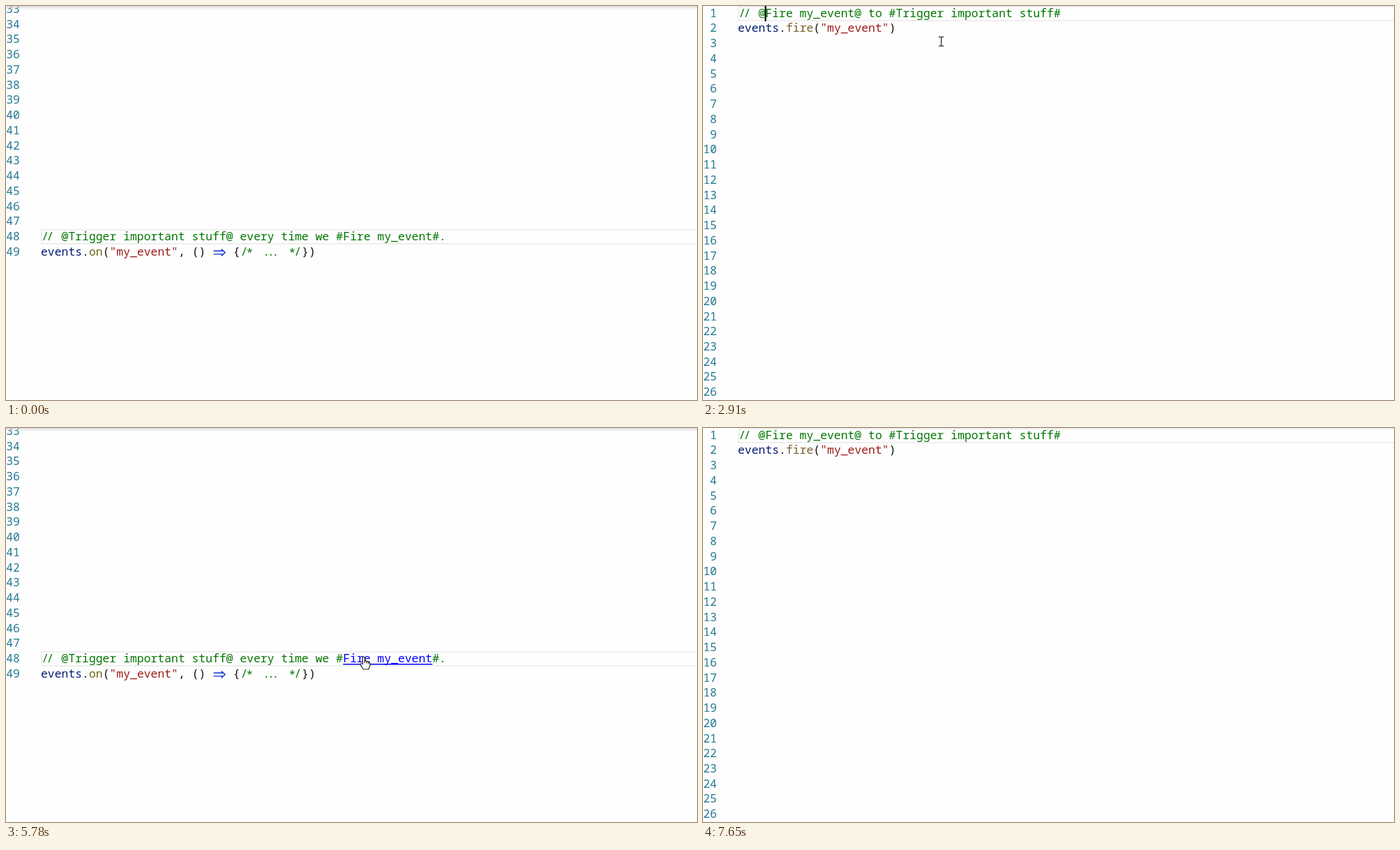
Animation, 991 px wide and 565 px high, one loop 8050 ms. Source, as an HTML page with a canvas:

```html
<!DOCTYPE html>
<html lang="en">
<head>
<meta charset="utf-8">
<title>Linked comments</title>
<style>
html, body { margin: 0; width: 100%; height: 100%; overflow: hidden; background: #fefefe; }
canvas { display: block; }
</style>
</head>
<body>
<canvas id="stage" width="991" height="565"></canvas>
<script>
const ctx = document.getElementById('stage').getContext('2d');
const LOOP = 8050, CELL = 9.85, ROW = 21.74, LEFT = 50;
const GREEN = '#007600', NAVY = '#001a70', OLIVE = '#795e26', RED = '#9c1a15',
      BLUE = '#0000ff', INK = '#111';

// Each page: code lines as [text, colour] runs, plus its marked and linked ranges.
const listener = {
  first: 33, last: 49, line: 48, base: 336, mark: [4, 23], link: [44, 13],
  code: [
    [['// @Trigger important stuff@ every time we #', GREEN], ['Fire my_event', GREEN], ['#.', GREEN]],
    [['events', NAVY], ['.', INK], ['on', '#6c6314'], ['(', INK], ['"my_event"', RED],
     [', () ', INK], ['=>', '#0a34d2'], [' {', INK], ['/* ... */', GREEN], ['})', INK]]
  ]
};
const sender = {
  first: 1, last: 26, line: 1, base: 15.7, mark: [4, 13], link: [23, 23],
  code: [
    [['// @Fire my_event@ to #', GREEN], ['Trigger important stuff', GREEN], ['#', GREEN]],
    [['events', NAVY], ['.', INK], ['fire', OLIVE], ['(', INK], ['"my_event"', RED], [')', INK]]
  ]
};

const JUMPS = [1670, 4010, 6170];
const HOVERS = [1440, 3540, 5870];
const HANDS = [[890, 1670], [3370, 4780], [5550, 6170]];
const LINKS = [[890, 1670], [3540, 4010], [5550, 6170]];

const easeOut = u => 1 - (1 - u) ** 3;
const easeInOut = u => u * u * (3 - 2 * u);
// start, end, from x, y, to x, y, easing
const MOVES = [
  [70, 400, 877, 493, 394, 243, easeInOut],
  [400, 740, 394, 243, 537, 333, easeInOut],
  [2530, 3290, 537, 333, 314, 11, easeOut],
  [4780, 5550, 314, 11, 513, 328, easeInOut],
  [6950, 7480, 513, 328, 862, 575, easeInOut]
];

const within = (list, t) => list.some(([a, b]) => t >= a && t < b);
const latest = (list, t) => list.filter(s => s <= t).pop();

// Horizontal shifts of the joined characters
const JOINED = { '//': [1.3, -1.3], '/*': [1, -1], '*/': [1, -1], '...': [3.4, 0, -3.4] };

function arrow(x, y) {
  ctx.beginPath();
  for (const d of [-2.3, 2.3]) {
    ctx.moveTo(x + 1.5, y + d);
    ctx.lineTo(x + 15.5, y + d);
  }
  ctx.moveTo(x + 12.5, y - 5);
  ctx.lineTo(x + 18, y);
  ctx.lineTo(x + 12.5, y + 5);
  ctx.lineWidth = 1.4;
  ctx.stroke();
}

function codeLine(runs, x, y, linkColour) {
  runs.forEach(([text, colour], i) => {
    ctx.fillStyle = ctx.strokeStyle = linkColour && i === 1 ? linkColour : colour;
    for (const part of text.split(/(\/\/|\/\*|\*\/|\.\.\.|=>)/)) {
      if (part === '=>') arrow(x, y - 4.2);
      else if (JOINED[part]) {
        [...part].forEach((c, k) =>
          ctx.fillText(c, x + k * CELL + JOINED[part][k], y + (c === '*' ? 2.5 : 0)));
      } else ctx.fillText(part, x, y);
      x += part.length * CELL;
    }
  });
}

function hover(page, other, alpha) {
  const x = LEFT + page.link[0] * CELL + 1, y = page.base - 67;
  ctx.globalAlpha = alpha;
  ctx.fillStyle = '#f1f4f4';
  ctx.fillRect(x, y, other.code[0].reduce((n, r) => n + r[0].length, 0) * CELL + 20.5, 53);
  ctx.strokeStyle = '#b4b8b8';
  ctx.lineWidth = 1;
  ctx.strokeRect(Math.round(x) + .5, Math.round(y) + .5,
    Math.round(other.code[0].reduce((n, r) => n + r[0].length, 0) * CELL + 20), 53);
  other.code.forEach((runs, i) => codeLine(runs, x + 10, y + 21.5 + i * ROW));
  ctx.globalAlpha = 1;
}

const handShape = new Path2D('M-1.5 9V1Q0-1 1.5 1V6Q4 5 4.4 7Q6.6 6 7 8Q9 7.6 9 10V13L7 18H-.5' +
  'L-4.6 11.5Q-5 8.6-1.5 10.5Z');
const fingers = new Path2D('M1.5 6V9M4.4 7V9.5M7 8V10');
const beam = new Path2D('M-3.5-6.5H-1L0-5.5L1-6.5H3.5M0-5.5V5.5M-3.5 6.5H-1L0 5.5L1 6.5H3.5');

function pointer(t) {
  if (t < 70 || t >= 7480) return;
  const [a, b, x0, y0, x1, y1, ease] = MOVES.filter(m => m[0] <= t).pop();
  const u = ease(Math.min(1, (t - a) / (b - a)));
  ctx.save();
  ctx.translate(x0 + (x1 - x0) * u, y0 + (y1 - y0) * u);
  ctx.strokeStyle = '#222';
  ctx.lineWidth = 1.2;
  if (within(HANDS, t)) {
    ctx.fillStyle = '#fff';
    ctx.fill(handShape);
    ctx.stroke(handShape);
    ctx.stroke(fingers);
  } else ctx.stroke(beam);
  ctx.restore();
}

function draw(t) {
  const jump = latest(JUMPS, t);
  const onListener = t < JUMPS[0] || (t >= JUMPS[1] && t < JUMPS[2]);
  const [page, other] = onListener ? [listener, sender] : [sender, listener];
  const { base, mark, link } = page;
  const top = Math.round(base - 16);

  ctx.fillStyle = '#fefefe';
  ctx.fillRect(0, 0, 991, 565);
  ctx.font = '16.42px "Noto Sans Mono", monospace';

  ctx.strokeStyle = '#eee';
  ctx.lineWidth = 2;
  ctx.strokeRect(LEFT + 1, top + 1, 1000, 20);
  if (t - jump < 410) {
    ctx.fillStyle = '#f8c9ab';
    ctx.fillRect(LEFT + mark[0] * CELL, top + 1, mark[1] * CELL, 21);
  }

  ctx.textAlign = 'right';
  ctx.fillStyle = '#237893';
  for (let n = page.first; n <= page.last; n++)
    ctx.fillText(n, 19.9, base + (n - page.line) * ROW);
  ctx.textAlign = 'left';

  const linked = within(LINKS, t);
  page.code.forEach((runs, i) => codeLine(runs, LEFT, base + i * ROW, linked && i === 0 && BLUE));
  if (linked) {
    ctx.fillStyle = BLUE;
    ctx.fillRect(LEFT + link[0] * CELL, Math.round(base + 1.6), link[1] * CELL, 1.5);
  }
  if ((t - jump) % 980 < 490) {
    ctx.fillStyle = '#000';
    ctx.fillRect(88.5, top, 2.2, 22);
  }

  if (onListener) {
    const shade = ctx.createLinearGradient(0, 0, 0, 6);
    shade.addColorStop(0, 'rgba(205,205,205,.7)');
    shade.addColorStop(1, 'rgba(221,221,221,0)');
    ctx.fillStyle = shade;
    ctx.fillRect(0, 0, 991, 6);
  }

  const shown = latest(HOVERS, t);
  if (linked && shown > (jump || 0)) hover(page, other, t - shown < 80 ? .68 : 1);
  pointer(t);
}

function tick() {
  draw(performance.now() % LOOP);
  requestAnimationFrame(tick);
}
tick();
</script>
</body>
</html>
```
